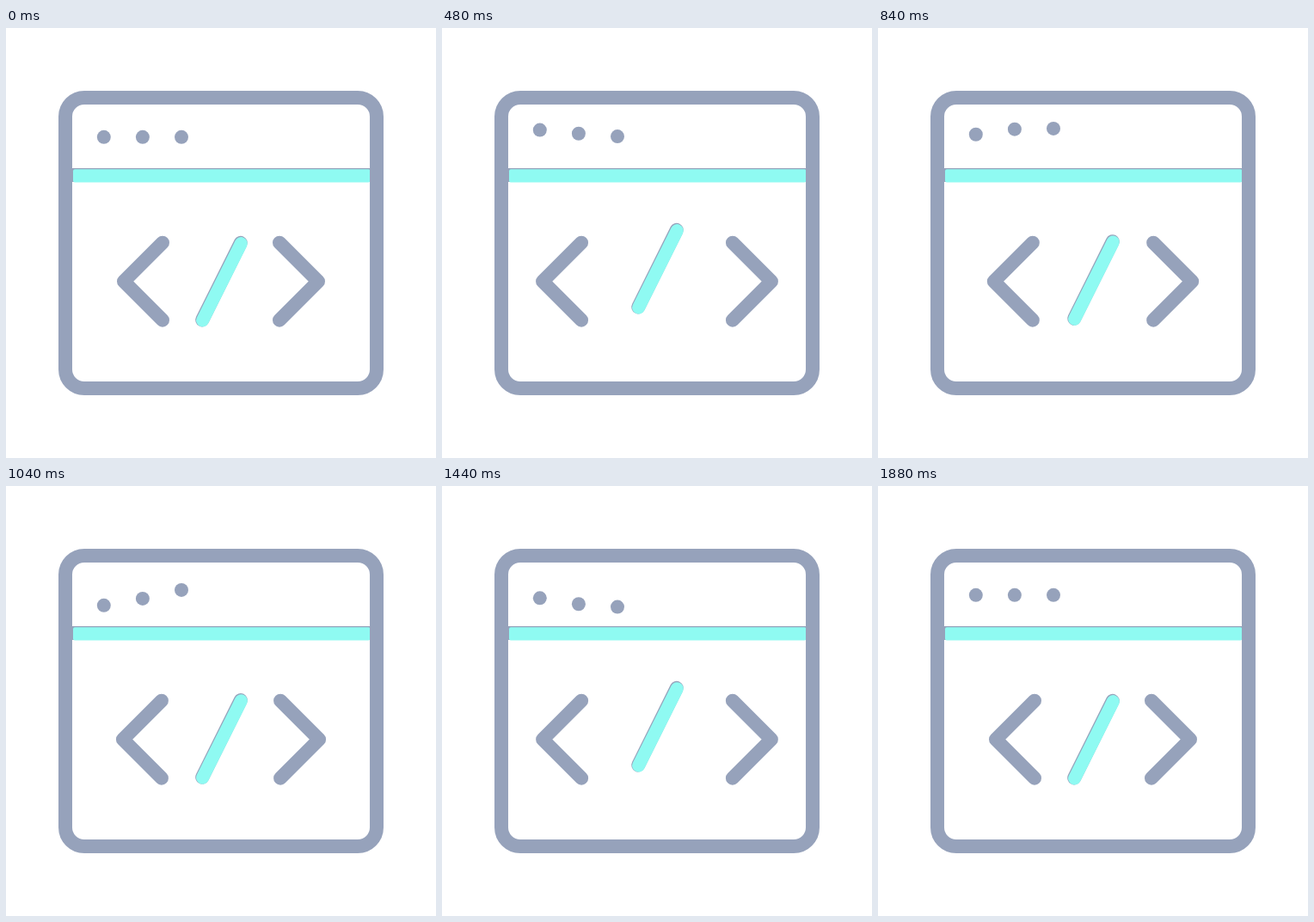
These frames come from a looping animation (500 px wide and 500 px high, 1.92 s). An HTML page:

```html
<!DOCTYPE html>
<html lang="en">
<head>
<meta charset="utf-8">
<title>Code window</title>
<style>
  html, body { margin: 0; width: 100%; height: 100%; overflow: hidden; background: #fff; }
  svg { display: block; width: 100vw; height: 100vh; }
</style>
</head>
<body>
<svg viewBox="0 0 500 500" fill="none" stroke="#96a2bb" stroke-width="16" stroke-linecap="round" stroke-linejoin="round">
  <rect x="77" y="163" width="347" height="16" fill="#96a2bb" stroke="none"/>
  <rect x="78" y="164.2" width="345.5" height="15.3" rx="2" fill="#8ffaf2" stroke="none"/>
  <rect x="69" y="81" width="362" height="338" rx="22"/>
  <g fill="#96a2bb" stroke="none">
    <circle class="dot" cx="113.8" cy="126.8" r="8"/>
    <circle class="dot" cx="158.9" cy="126.8" r="8"/>
    <circle class="dot" cx="204" cy="126.8" r="8"/>
  </g>
  <path id="left" d="M182 249.7L137 294.7L182 339.7"/>
  <path id="right" d="M318 249.7L363 294.7L318 339.7"/>
  <g id="slash">
    <path d="M272.8 249.8L228.2 339.4"/>
    <path d="M273.3 250.6L228.6 340" stroke="#8ffaf2" stroke-width="15"/>
  </g>
</svg>
<script>
  const LOOP = 1920, STEP = 40, DOT_DELAY = 120;
  // Keys are [time in ms, value]
  const SPREAD = [[60, 0], [500, 20], [955, 0], [1415, 20], [1800, 0]];
  const BOUNCE = [[130, 0], [640, -10], [1155, 14], [1605, 0]];

  const left = document.getElementById('left');
  const right = document.getElementById('right');
  const slash = document.getElementById('slash');
  const dots = document.querySelectorAll('.dot');

  // cubic-bezier(.5, 0, .5, 1), solved with Newton's method
  function ease(x) {
    let t = x;
    for (let i = 0; i < 5; i++) {
      t -= (1.5 * t - 1.5 * t * t + t ** 3 - x) / (1.5 - 3 * t + 3 * t * t);
    }
    return t * t * (3 - 2 * t);
  }

  function valueAt(keys, time) {
    if (time <= keys[0][0]) return keys[0][1];
    for (let i = 1; i < keys.length; i++) {
      const [t0, v0] = keys[i - 1], [t1, v1] = keys[i];
      if (time < t1) return v0 + (v1 - v0) * ease((time - t0) / (t1 - t0));
    }
    return keys[keys.length - 1][1];
  }

  function move(el, x, y) {
    el.setAttribute('transform', `translate(${x} ${y})`);
  }

  function draw(now) {
    const time = Math.floor((now % LOOP) / STEP) * STEP;
    const spread = valueAt(SPREAD, time);
    move(left, -spread, 0);
    move(right, spread, 0);
    move(slash, 0, -spread * 0.75);
    dots.forEach((dot, i) => move(dot, 0, valueAt(BOUNCE, time - i * DOT_DELAY)));
  }

  const start = performance.now();
  function tick() {
    draw(performance.now() - start);
    requestAnimationFrame(tick);
  }
  tick();
</script>
</body>
</html>
```
